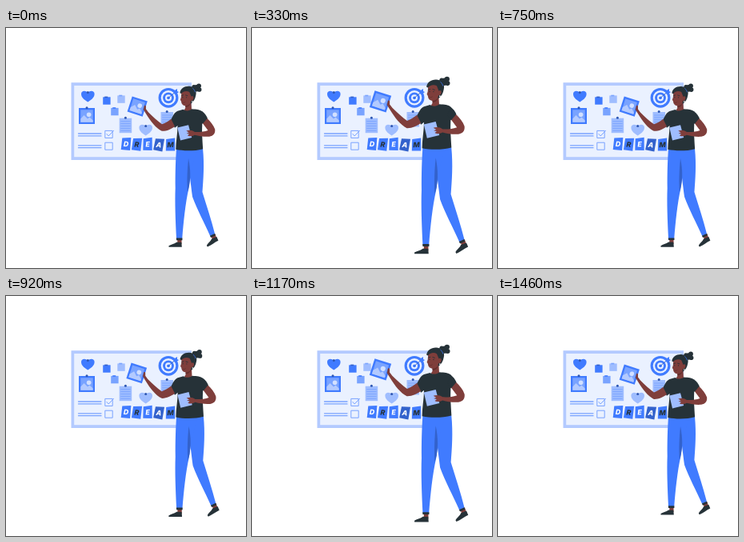
Recreate the animation shown at these times as an HTML page with a canvas. Size 300x300 px, loop 1.5 s.

```html
<!DOCTYPE html>
<html lang="en">
<head>
<meta charset="utf-8">
<title>Vision board</title>
<style>
  html, body { margin: 0; width: 100%; height: 100%; overflow: hidden; background: #fff; }
  canvas { display: block; width: 300px; height: 300px; }
</style>
</head>
<body>
<canvas id="stage"></canvas>
<script>
const canvas = document.getElementById('stage');
const ctx = canvas.getContext('2d');
const ratio = window.devicePixelRatio || 1;
canvas.width = canvas.height = 300 * ratio;

const BLUE = '#407bff', DEEP = '#3362cc', MID = '#79a3ff', LIGHT = '#9fbdff',
      SOFT = '#b3caff', PALE = '#eaf1ff', DARK = '#263238', SKIN = '#7f3e3b', SHADE = '#632f2e';
const LOOP = 1500;
const GROWTH = 0.087;
const PIVOT = { x: 208.5, y: 172 };
// [time, amount] turning points of the pulse
const PULSE = [[-30, 0], [290, 1], [790, 0], [1160, 1], [1470, 0], [1790, 1]];

function fill(path, color) {
  ctx.fillStyle = color;
  ctx.fill(new Path2D(path));
}

function line(path, color, width) {
  ctx.strokeStyle = color;
  ctx.lineWidth = width;
  ctx.lineCap = ctx.lineJoin = 'round';
  ctx.stroke(new Path2D(path));
}

function rect(x, y, w, h, color) {
  ctx.fillStyle = color;
  ctx.fillRect(x, y, w, h);
}

function disc(x, y, r, color) {
  ctx.fillStyle = color;
  ctx.beginPath();
  ctx.arc(x, y, r, 0, Math.PI * 2);
  ctx.fill();
}

function placed(x, y, angle, draw) {
  ctx.save();
  ctx.translate(x, y);
  ctx.rotate(angle);
  draw();
  ctx.restore();
}

function pin(x, y) {
  disc(x, y, 1.5, '#2d56b3');
}

function heart(x, y, color) {
  placed(x, y, 0, () => fill('M0 7C-3 5-8.3 2-8.3-3C-8.3-7-3-8 0-4.5C3-8 8.3-7 8.3-3C8.3 2 3 5 0 7Z', color));
  pin(x, y - 5);
}

function picture(x, y, angle) {
  placed(x, y, angle, () => {
    rect(-10, -10, 20, 20, BLUE);
    rect(-7.7, -7.7, 15.4, 15.4, MID);
    fill('M-7.7 7.7V3.5L-3.5-1L1 3.5L3.5 1.5L7.7 5.5V7.7Z', SOFT);
    disc(2.6, -1.8, 2.8, '#d2e0ff');
  });
}

function note(x, y) {
  rect(x, y, 15.5, 18.5, LIGHT);
  for (let i = 0; i < 5; i++) line(`M${x + 2} ${y + 4 + i * 2.9}h11.5`, MID, 0.9);
  pin(x + 7.7, y - 0.5);
}

function sticky(x, y, color, tab) {
  rect(x, y, 9.4, 9.4, color);
  rect(x + 2, y - 0.7, 4, 1.6, tab);
}

function tile(letter, x, y, angle, color, ink) {
  placed(x, y, angle, () => {
    fill('M-5-7.2L6-8.2L5.4 7.8L-6 7.2Z', color);
    ctx.fillStyle = ink;
    ctx.font = 'italic 800 8.8px Inter, "Open Sans", sans-serif';
    ctx.textAlign = 'center';
    ctx.textBaseline = 'middle';
    ctx.fillText(letter, 0, 0.5);
  });
}

function drawBoard() {
  rect(81.5, 68.2, 150.5, 96.8, SOFT);
  rect(85.2, 72, 143.1, 89.2, PALE);

  heart(102.3, 85.5, BLUE);
  picture(101, 110, 0);
  pin(101, 99.7);
  sticky(121.2, 86.3, BLUE, DEEP);
  sticky(139.3, 84.4, LIGHT, MID);
  sticky(131.2, 99.9, MID, BLUE);
  note(141.7, 112.7);
  note(193.5, 105);
  heart(174.7, 127.5, LIGHT);

  for (const y of [132, 146.8]) {
    line(`M90.5 ${y}H119M90.5 ${y + 2.9}H119`, MID, 1.3);
    line(`M124.2 ${y - 3.6}h9v9h-9Z`, MID, 1);
  }
  line('M126 132.5L128.2 135L134.5 128.3', MID, 1);

  [[12.4, BLUE], [9.2, PALE], [6.9, BLUE], [4, PALE], [1.9, BLUE]]
    .forEach(([r, color]) => disc(203, 87.3, r, color));
  line('M203 87.3L213 79', DEEP, 0.9);
  fill('M209.5 82L210 78.5L214 76L214 79L216 80L213 82.5Z', BLUE);

  tile('D', 150, 145, 0.04, BLUE, '#fff');
  tile('R', 163.5, 145.5, 0.08, BLUE, DARK);
  tile('E', 177, 145.3, -0.04, BLUE, '#fff');
  tile('A', 191, 146, 0.13, DEEP, '#fff');
  tile('M', 205.5, 146, -0.04, BLUE, DARK);
}

function drawLegs() {
  fill('M214.3 264H219.5V270H214.3Z', SKIN);
  fill('M256.3 259L261.3 257L263.5 263.5L258.5 266.5Z', SKIN);
  fill('M203.5 273.6V272C206 270.3 210 270 213.3 267.5L219.3 267.7L219.8 273.6Z', DARK);
  fill('M250.8 271.8C251.8 268.8 255.5 267 257 263.3L263.3 260.8L265.3 265.6C260.5 267.8 256.8 271.2 251.8 273.3Z', DARK);

  fill('M228 151H246C248 171 246.6 189 245.4 205C250.6 222 256.6 240 261 257.3L255.2 260C247.7 243 238.8 227 233 211C231 196 229 176 226 163Z', BLUE);
  fill('M213 151H240C233 168 230.5 184 228.5 200C224 220 222 242 220.2 263H213C211.9 241 211 218 211.7 200C211.5 183 212 165 213 151Z', BLUE);
  fill('M228 163C231 178 230.5 187 229 197L226.8 205C226 190 226.5 178 228 163Z', DEEP);
  fill('M212.8 262.3H220.4V265H213Z', DARK);
  fill('M254.8 259.6L260.9 256.8L261.8 259.2L256 261.8Z', DARK);
}

function drawTorso() {
  fill('M224 94H231.5L232 102.5C230 105 225 105 222.5 102.8L224.3 100Z', SKIN);
  fill('M221.5 102C224.5 104.2 229 104 232.3 101.4C238 101.8 242.5 102 245.5 104.7L251.5 112.8L245.2 119.8C244.6 130 245.4 140 246.1 151.2C236 154 222 154 212.3 151.9C212.3 142 214.5 132 214.5 122L211 124.8L205.8 115.9C208.5 110 210.8 105.5 214.5 104Z', DARK);
}

function drawHead() {
  disc(238.2, 75.5, 4.3, DARK);
  disc(234.9, 73.8, 2.6, DARK);
  disc(241, 72.5, 2.9, DARK);
  disc(241.6, 77.2, 2.8, DARK);
  fill('M217.4 81.5C217.8 75.5 224.5 72 230.3 73.3C236 74.2 238.6 79 237.3 84C236.5 89 234.3 92.5 231 94.8L223 84Z', DARK);
  fill('M219.2 82C221 79.6 225.5 78 229.2 80.2L231.6 86C233 84.3 235 85.9 234.3 88.5C233.8 90.6 232.3 91.2 231.3 90.9C230.4 95 228.4 97.5 225.3 97.4C221.3 97.3 219.2 95.2 219 91.8L217.8 89.8L218.8 86.8Z', SKIN);
  line('M233.6 75.7C235 76.8 235.8 78.2 236.2 80', BLUE, 0.7);
  line('M219.8 84.6L221.7 84M224.5 84.1L226.8 84.8', DARK, 0.8);
  disc(220.9, 86.8, 0.6, DARK);
  disc(225.5, 86.9, 0.6, DARK);
  line('M220.8 93.2C222 93.9 223.2 93.5 224 92.7', SHADE, 0.7);
  disc(232.8, 92, 0.8, '#fff');
  fill('M224.3 97.2C227 97.4 229 96.3 230.8 93.5C230.5 96.5 228 99 224.3 99.5Z', SHADE);
}

function drawArms() {
  picture(164.3, 98.2, 0.31);
  fill('M206.3 113.8L211 123C206.5 126.3 200.5 129.2 194.8 128.9C187.5 125.2 181 117 174.8 106.8L171.8 102L173 97.2C174 96.4 175 97 175 98.4L175 101.5L178 105.5C183.8 111.3 189.5 116.5 195 120.4C199.5 118.6 203 116.5 206.3 113.8Z', SKIN);

  fill('M214.3 124.6L228 121.3L232.2 137L218 140.5Z', LIGHT);
  fill('M251 112.5C255.7 117 259.4 121.7 261.1 126.6C261.8 131.8 259.2 135 254 135.8C248 136.3 241.6 135.3 235.8 133.8C232.4 135.6 228.6 135.8 226.9 134.3L229.1 132.7L225.6 131.6L228.6 130.5L225.2 128.5C228.9 127.2 232.6 127.6 235.9 130C241.8 130.3 247.4 129.8 252.4 128L245.5 118.8Z', SKIN);
  fill('M245 104.5C248.4 106.7 250.3 109.5 251.7 112.8L245.8 119.8L241.5 114Z', DARK);
}

function pulseAt(time) {
  const i = PULSE.findIndex(([end]) => time < end);
  const [t0, a] = PULSE[i - 1];
  const [t1, b] = PULSE[i];
  const eased = (1 - Math.cos(Math.PI * (time - t0) / (t1 - t0))) / 2;
  return a + (b - a) * eased;
}

function render(now) {
  ctx.setTransform(ratio, 0, 0, ratio, 0, 0);
  rect(0, 0, 300, 300, '#fff');
  drawBoard();

  const scale = 1 + GROWTH * pulseAt(now % LOOP);
  ctx.translate(PIVOT.x, PIVOT.y);
  ctx.scale(scale, scale);
  ctx.translate(-PIVOT.x, -PIVOT.y);
  drawLegs();
  drawTorso();
  drawHead();
  drawArms();
}

const start = performance.now();
function tick() {
  render(performance.now() - start);
  requestAnimationFrame(tick);
}
tick();
</script>
</body>
</html>
```
